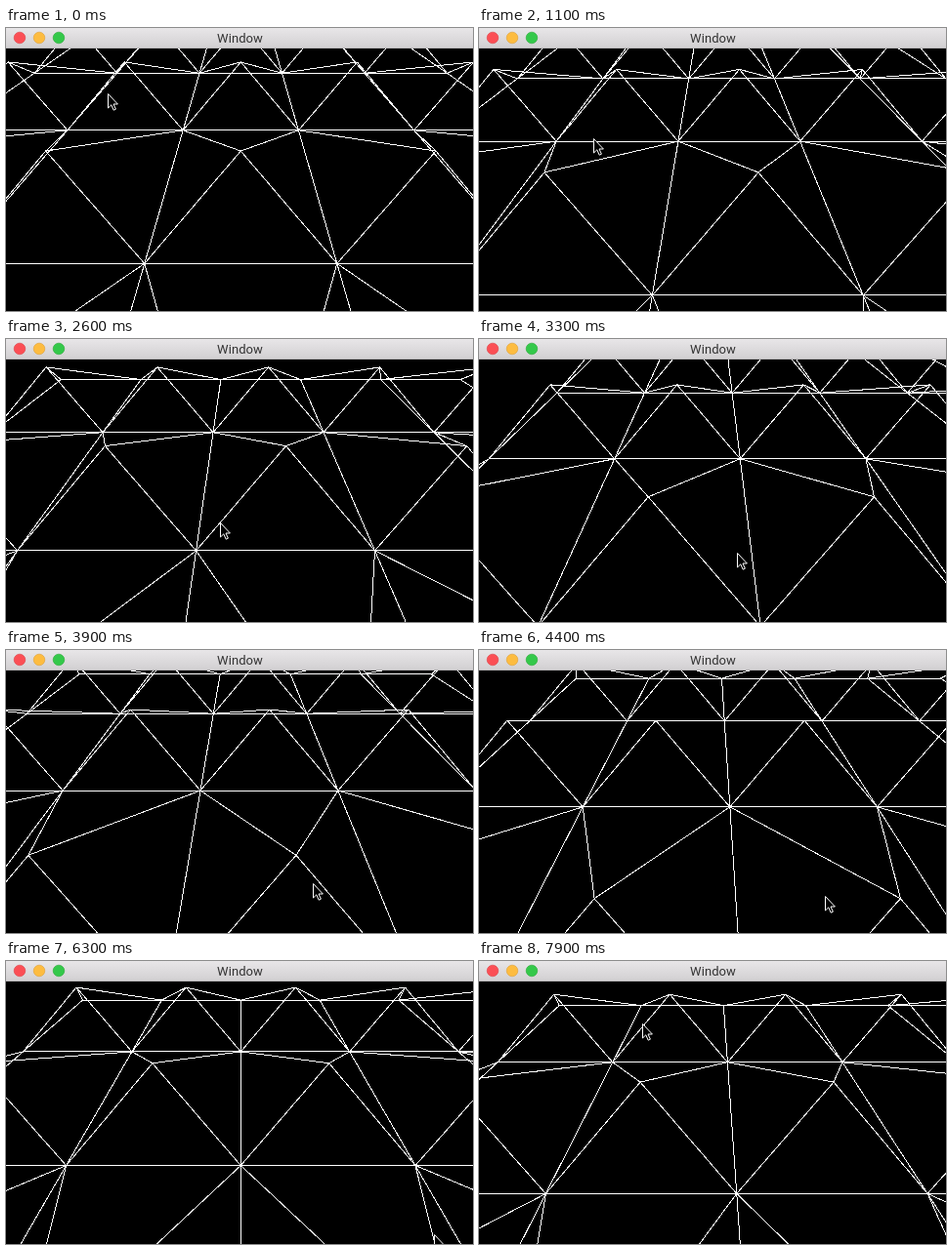
Write an HTML page that moves like this. It is 478 px wide and 290 px high and loops after 8 s.

```html
<!DOCTYPE html>
<html>
<head>
<meta charset="utf-8">
<style>
html, body { margin: 0; width: 100%; height: 100%; overflow: hidden; background: #000; }
svg { display: block; }
text { font: 13px Roboto, "Open Sans", sans-serif; letter-spacing: .1px; }
</style>
</head>
<body>
<svg width="478" height="290" viewBox="0 0 478 290">
  <defs>
    <linearGradient id="bar" x2="0" y2="1">
      <stop stop-color="#e8e6e8"/>
      <stop offset="1" stop-color="#d1cfd1"/>
    </linearGradient>
  </defs>
  <rect width="478" height="290"/>
  <path id="mesh" fill="none" stroke="#fff" shape-rendering="crispEdges"/>
  <rect width="478" height="21" fill="url(#bar)"/>
  <rect y="20" width="478" height="1" fill="#bab8ba"/>
  <g stroke-width=".6">
    <circle cx="14" cy="10" r="5.8" fill="#fb4f55" stroke="#dd4046"/>
    <circle cx="34" cy="10" r="5.8" fill="#fdbc40" stroke="#dfa035"/>
    <circle cx="54" cy="10" r="5.8" fill="#34c84a" stroke="#27aa35"/>
  </g>
  <text x="239.5" y="15" text-anchor="middle" fill="#333">Window</text>
  <path id="pointer" d="M.5.5V15L3.8 11.8L6.2 17.2L8.4 16.2L6 11H10.4Z" stroke="#fff"/>
</svg>
<script>
const LOOP = 8000, STEP = 100;
const COLS = 5, PEAK = 0.3, SCALE = 295.6, CENTER = 240.3, HORIZON = -100;

// time, pointer x, pointer y, terrain x, terrain z
const keys = [
  [0, 104, 67, .5, 0],
  [300, 97, 100, .5, 0],
  [600, 97, 100, .5, 0],
  [1800, 171, 149, 1.259, -.49],
  [3300, 264, 219, 2.21, -1.202],
  [4400, 354, 252, 3.11, -1.537],
  [5300, 407, 269, 3.65, -1.72],
  [6100, 438, 280, 4, -1.846],
  [6300, 438, 280, 4, -1.846],
  [7100, 232, 79, 4, -1.846],
  [7400, 154, 49, 4, -1.846],
  [7500, 154, 49, 4, -1.846],
  [7900, 167, 64, 4.12, -1.987]
];

function slope(i, c) {
  const a = keys[i], b = keys[i + 1];
  return a && b ? (b[c] - a[c]) / (b[0] - a[0]) : null;
}

function tangent(i, c) {
  const p = slope(i - 1, c), q = slope(i, c);
  if (p === null || q === null) return p ?? q;
  return p * q > 0 ? 2 * p * q / (p + q) : 0;
}

// Monotone cubic through the keys
function sample(t, c) {
  const i = keys.findLastIndex(k => k[0] <= t);
  if (i === keys.length - 1) return keys[i][c];
  const a = keys[i], b = keys[i + 1], span = b[0] - a[0];
  const u = (t - a[0]) / span, v = 1 - u;
  return a[c] * v * v * (1 + 2 * u) + b[c] * u * u * (3 - 2 * u)
    + span * u * v * (tangent(i, c) * v - tangent(i + 1, c) * u);
}

// Camera pitched down by 60 degrees
function project(x, z, h) {
  const s = SCALE / (z - Math.sqrt(3) * h);
  return [CENTER + x * s, HORIZON + (Math.sqrt(3) - 2 * h) * s].map(n => n.toFixed(2));
}

function meshPath(panX, panZ) {
  const left = panX - Math.floor(panX + .5) - 2;
  const back = panZ - Math.ceil(panZ) + 4.5;
  let d = "";
  const line = (a, b) => d += `M${a}L${b}`;
  const row = z => line(project(left, z, 0), project(left + COLS, z, 0));

  row(back);
  for (let far = back; far - 1 > .25; far--) {
    const near = far - 1;
    row(near);
    for (let i = 0; i <= COLS; i++) {
      const x = left + i;
      line(project(x, far, 0), project(x, near, 0));
      if (i === COLS) break;
      const top = project(x + .5, near + .5, PEAK);
      for (const z of [near, far])
        for (const side of [x, x + 1]) line(top, project(side, z, 0));
    }
  }
  return d;
}

const mesh = document.getElementById("mesh");
const pointer = document.getElementById("pointer");

function draw() {
  const t = Math.floor(performance.now() % LOOP / STEP) * STEP;
  const [px, py, x, z] = [1, 2, 3, 4].map(c => sample(t, c));
  mesh.setAttribute("d", meshPath(x, z));
  pointer.setAttribute("transform", `translate(${Math.round(px)} ${Math.round(py)})`);
  requestAnimationFrame(draw);
}
draw();
</script>
</body>
</html>
```
